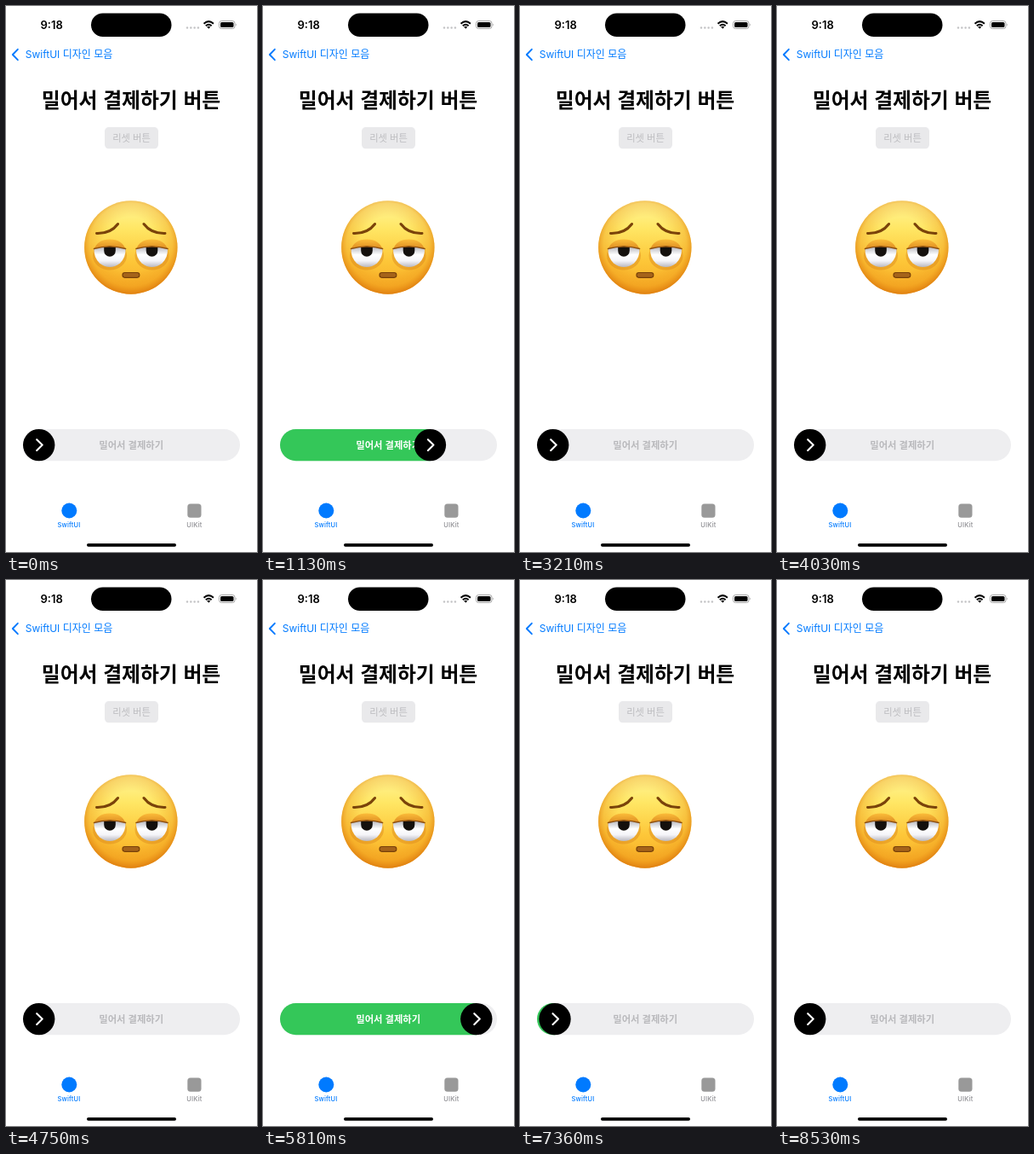
Animation, 295 px wide and 640 px high, one loop 8.58 s. Source, as an HTML page:

```html
<!DOCTYPE html>
<html lang="ko">
<head>
<meta charset="utf-8">
<title>밀어서 결제하기 버튼</title>
<style>
  html, body { margin: 0; width: 100%; height: 100%; overflow: hidden; background: #fff; }
  svg { display: block; width: 295px; height: 640px; }
  text { font-family: Inter, "Noto Sans CJK KR", "Noto Sans CJK", sans-serif; }
  .ko { font-family: "Noto Sans CJK KR", "Noto Sans CJK", sans-serif; text-anchor: middle; }
  .label { font-size: 11.3px; font-weight: 500; }
  .strong { font-weight: 700; }
  .tab { font-size: 7.5px; font-weight: 500; letter-spacing: .2px; text-anchor: middle; }
  .line { fill: none; stroke-linecap: round; stroke-linejoin: round; }
</style>
</head>
<body>
<svg viewBox="0 0 295 640">
  <defs>
    <linearGradient id="skin" x1="0" y1="0" x2="0" y2="1">
      <stop offset="0" stop-color="#fff79a"/>
      <stop offset=".3" stop-color="#ffe664"/>
      <stop offset=".65" stop-color="#fdc638"/>
      <stop offset="1" stop-color="#f6a824"/>
    </linearGradient>
    <radialGradient id="rim" cy=".47" r=".54">
      <stop offset=".55" stop-color="#e88a10" stop-opacity="0"/>
      <stop offset=".82" stop-color="#ea9014" stop-opacity=".32"/>
      <stop offset="1" stop-color="#d8720a" stop-opacity=".85"/>
    </radialGradient>
    <radialGradient id="star" gradientUnits="userSpaceOnUse" cx="0" cy="-3" r="31">
      <stop offset="0" stop-color="#fffbd2"/>
      <stop offset=".45" stop-color="#fff2a6"/>
      <stop offset="1" stop-color="#f9cf5c"/>
    </radialGradient>
    <linearGradient id="lid" x1="0" y1="0" x2="0" y2="1">
      <stop offset="0" stop-color="#fbbd3a"/>
      <stop offset="1" stop-color="#d9821c"/>
    </linearGradient>
    <linearGradient id="eye" x1="0" y1="0" x2="0" y2="1">
      <stop offset="0" stop-color="#b4b5bd"/>
      <stop offset=".4" stop-color="#fff"/>
      <stop offset=".7" stop-color="#f4f4f8"/>
      <stop offset="1" stop-color="#b9b8c0"/>
    </linearGradient>
    <linearGradient id="mouth" x1="0" y1="0" x2="0" y2="1">
      <stop offset="0" stop-color="#6e430a"/>
      <stop offset="1" stop-color="#986314"/>
    </linearGradient>
    <linearGradient id="china" x1="0" y1="0" x2="1" y2="0">
      <stop offset="0" stop-color="#a9a5a0"/>
      <stop offset=".3" stop-color="#e6e3df"/>
      <stop offset=".65" stop-color="#c4bfba"/>
      <stop offset="1" stop-color="#8d8883"/>
    </linearGradient>
    <linearGradient id="plate" x1="0" y1="0" x2="0" y2="1">
      <stop offset="0" stop-color="#aaa6a1"/>
      <stop offset="1" stop-color="#d8d5d1"/>
    </linearGradient>
    <clipPath id="filled"><rect id="fillClip" x="20" y="496" width="0" height="38"/></clipPath>
    <clipPath id="smile"><path id="lips" d="M111.500 290.500Q147.500 296 183.500 290.500Q182 322.500 147.500 322.500Q113 322.500 111.500 290.500Z"/></clipPath>
    <g id="head">
      <circle r="54.700" fill="url(#skin)"/>
      <circle r="54.700" fill="url(#rim)"/>
    </g>
    <g id="sadEye">
      <ellipse cy="2" rx="20" ry="17" fill="#d9851c" opacity=".45"/>
      <path d="M-19-4Q-15-17 0-17Q15-17 19-4Z" fill="url(#lid)"/>
      <path d="M-18.500-6Q0-11 18.500-6Q19 4 12 11Q0 20-12 11Q-19 4-18.500-6Z" fill="url(#eye)"/>
      <path d="M-6.800-8Q0-9.500 6.800-8V-3.500A6.800 6.800 0 0 1-6.800-3.500Z" fill="#14100d"/>
      <path class="line" d="M-18.500-6Q0-11 18.500-6" stroke="#8d5010" stroke-width="1.600"/>
    </g>
    <path id="starShape" stroke-linejoin="round"/>
    <g id="starEye">
      <use href="#starShape" y="1.500" fill="#a8610c" stroke="#a8610c" stroke-width="5.500" opacity=".6"/>
      <use href="#starShape" fill="#eeb03a" stroke="#eeb03a" stroke-width="5"/>
      <use href="#starShape" fill="url(#star)" stroke="url(#star)" stroke-width="2.600"/>
    </g>
  </defs>

  <!-- status bar -->
  <text x="53.700" y="26.700" font-size="13" font-weight="600" text-anchor="middle">9:18</text>
  <rect x="100" y="8.500" width="94.500" height="27.500" rx="13.750"/>
  <g fill="#c3c3c5">
    <circle cx="213" cy="25.500" r="1.200"/><circle cx="217.300" cy="25.500" r="1.200"/>
    <circle cx="221.600" cy="25.500" r="1.200"/><circle cx="225.900" cy="25.500" r="1.200"/>
  </g>
  <path d="M232.500 20.700Q238.200 15.500 243.900 20.700M234.800 23.300Q238.200 20.200 241.600 23.300" fill="none" stroke="#000" stroke-width="2"/>
  <path d="M236.200 24.600Q238.200 23 240.200 24.600L238.200 26.800Z"/>
  <rect x="250.500" y="17.500" width="18.500" height="9" rx="2.800" fill="none" stroke="#a5a5a5"/>
  <rect x="252" y="19" width="15.500" height="6" rx="1.600"/>
  <path d="M270 20.500Q271.800 22 270 23.500Z" fill="#a5a5a5"/>

  <!-- header -->
  <path class="line" d="M13.800 50.800L7.800 57L13.800 63.200" stroke="#007aff" stroke-width="1.900"/>
  <text x="22.800" y="61" font-size="12" fill="#007aff">SwiftUI 디자인 모음</text>
  <text class="ko" x="147" y="119.300" font-size="23.800" font-weight="700">밀어서 결제하기 버튼</text>

  <!-- reset button -->
  <rect x="116" y="142" width="63" height="25.300" rx="4.800" fill="#e9e9eb"/>
  <text class="ko label" x="147.500" y="158.600" fill="#bdbdc0">리셋 버튼</text>
  <g id="ready">
    <rect x="116" y="142" width="63" height="25.300" rx="4.800" fill="#fff"/>
    <rect id="face" x="116" y="142" width="63" height="25.300" rx="4.800" fill="#34c759"/>
    <text class="ko label" x="147.500" y="158.600" fill="#fff">리셋 버튼</text>
  </g>

  <!-- tired face -->
  <g id="sad">
    <use href="#head" x="146.800" y="283"/>
    <use href="#sadEye" x="122" y="290.500"/>
    <use href="#sadEye" x="171.500" y="290.500"/>
    <path class="line" d="M106.500 266.500Q123 267 131.500 255.500M187 266.500Q170.500 267 162 255.500" stroke="#7a430a" stroke-width="3"/>
    <rect x="137" y="312.500" width="19.800" height="5.800" rx="2.700" fill="#a5631a" stroke="#784109" stroke-width="1.200"/>
  </g>

  <!-- happy face and coffee -->
  <g id="happy">
    <use href="#head" x="147.500" y="280.800"/>
    <g clip-path="url(#smile)">
      <rect x="108" y="286" width="80" height="40" fill="url(#mouth)"/>
      <path d="M110 289Q147.500 295.500 185 289L183 300.500Q147.500 309 112 300.500Z" fill="#f3f4f8"/>
    </g>
    <use href="#lips" fill="none" stroke="#7d4a08" stroke-width="1.300"/>
    <use href="#starEye" transform="translate(117 260.500) rotate(-6)"/>
    <use href="#starEye" transform="translate(177 260.500) rotate(6)"/>
  </g>
  <g id="coffee">
    <ellipse cx="146" cy="412.500" rx="36" ry="16.500" fill="#8f8a85"/>
    <ellipse cx="146" cy="411" rx="36" ry="16" fill="url(#plate)"/>
    <ellipse cx="146" cy="413" rx="24" ry="9.500" fill="#8c8781"/>
    <path class="line" d="M168 393Q181 388 181.500 394Q181 402 164 405" stroke="#a09b95" stroke-width="3.400"/>
    <path d="M123.500 389Q125 408 136 415Q147 420 158 415Q169 408 170.500 389Z" fill="url(#china)"/>
    <ellipse cx="147" cy="389" rx="23.500" ry="8.500" fill="#dedbd7" stroke="#a29d97" stroke-width=".8"/>
    <ellipse cx="147" cy="389.800" rx="21.300" ry="7" fill="#21160f"/>
    <path d="M130 391.500Q146 399 164 391.500Q147 394.500 130 391.500Z" fill="#5a3c25"/>
    <g fill="#d3d4d5" opacity=".8">
      <circle cx="139" cy="367.500" r="3.300"/><circle cx="145" cy="366" r="3"/>
      <circle cx="149.500" cy="370.500" r="3"/><circle cx="142" cy="373.500" r="3.200"/>
      <path d="M140 374Q148 379 143 385Q152 379 149 371Z"/>
    </g>
  </g>

  <!-- slider -->
  <rect x="20" y="496" width="255" height="37.200" rx="18.600" fill="#eeeef0"/>
  <text class="ko label strong" x="147.200" y="518.600" fill="#b9b9bc">밀어서 결제하기</text>
  <g clip-path="url(#filled)">
    <rect x="20" y="496" width="255" height="37.200" rx="18.600" fill="#34c759"/>
    <text class="ko label strong" x="147.200" y="518.600" fill="#fff">밀어서 결제하기</text>
  </g>
  <g id="knob">
    <circle cy="514.600" r="18.700"/>
    <path class="line" d="M-2.500 508.200L4 514.600L-2.500 521" stroke="#fff" stroke-width="2.100"/>
  </g>

  <!-- tab bar -->
  <circle cx="74.300" cy="591.500" r="9" fill="#007aff"/>
  <text class="tab" x="74" y="611" fill="#007aff">SwiftUI</text>
  <rect x="213.300" y="583.500" width="16.200" height="16.200" rx="3.500" fill="#999"/>
  <text class="tab" x="221.400" y="611" fill="#8e8e93">UIKit</text>
  <rect x="95" y="630" width="105" height="3.700" rx="1.850"/>
</svg>
<script>
const LOOP = 8580, REST = 38.7, END = 256.4;
const $ = id => document.getElementById(id);
const clamp = v => Math.min(1, Math.max(0, v));
const ease = {
  in: p => p ** 1.4,
  linear: p => p,
  out: p => 1 - (1 - p) ** 3,
  both: p => p * p * (3 - 2 * p)
};

// knob moves: start, end, target x, easing
const moves = [
  [810, 1130, 196, 'in'],
  [1130, 1280, END, 'linear'],
  [2510, 2960, REST, 'out'],
  [4030, 4370, 171, 'both'],
  [4370, 4740, REST, 'out'],
  [4980, 5700, 218, 'in'],
  [5700, 5830, END, 'linear'],
  [7010, 7460, REST, 'out']
];
// paid periods: completion, press on reset, release
const paid = [[1290, 2390, 2510], [5840, 6890, 7010]];

function knobX(t) {
  let x = REST;
  for (const [a, b, to, kind] of moves) {
    if (t < a) break;
    x += (to - x) * ease[kind](clamp((t - a) / (b - a)));
  }
  return x;
}

function starPath(outer, inner) {
  let d = '';
  for (let i = 0; i < 10; i++) {
    const r = i % 2 ? inner : outer, a = (i / 5 - .5) * Math.PI;
    d += (i ? 'L' : 'M') + (r * Math.cos(a)).toFixed(2) + ' ' + (r * Math.sin(a)).toFixed(2);
  }
  return d + 'Z';
}
$('starShape').setAttribute('d', starPath(29, 13));

function draw(t) {
  const x = knobX(t);
  $('knob').setAttribute('transform', `translate(${x} 0)`);
  $('fillClip').setAttribute('width', x > REST + .3 ? x - 20 : 0);

  let joy = 0, pressed = false;
  for (const [start, press, release] of paid) {
    if (t >= start && t < release + 400) {
      joy = ease.both(clamp((t - start) / 240)) * (1 - ease.both(clamp((t - release) / 350)));
      pressed = t >= press;
    }
  }
  $('sad').setAttribute('opacity', 1 - joy);
  for (const id of ['happy', 'coffee', 'ready']) $(id).setAttribute('opacity', joy);
  $('face').setAttribute('opacity', pressed ? .46 : 1);
}

function tick(now) {
  draw(now % LOOP);
  requestAnimationFrame(tick);
}
draw(0);
requestAnimationFrame(tick);
</script>
</body>
</html>
```
